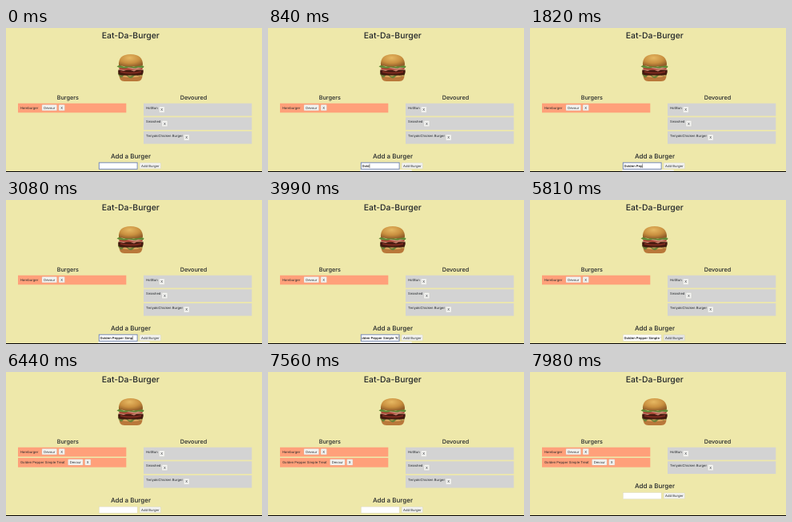
Animation of 320 by 181 pixels, one loop 8 s. Source, as an HTML page:

```html
<!DOCTYPE html>
<html lang="en">
<head>
<meta charset="utf-8">
<title>Eat-Da-Burger</title>
<style>
  html, body { margin: 0; width: 100%; height: 100%; overflow: hidden; background: #eee8aa; }
  svg { display: block; }
  text { font: 4.2px Inter, sans-serif; fill: #212529; white-space: pre; text-rendering: geometricPrecision; }
  .title { font-size: 10.4px; font-weight: 500; text-anchor: middle; }
  .form-title { font-size: 8px; font-weight: 500; text-anchor: middle; }
  .column { font-size: 7.25px; font-weight: 500; text-anchor: middle; }
  .label { text-anchor: middle; }
  .typed { fill: #000; font-weight: 500; }
  .button { fill: #f3f3f1; stroke: #c9c7bd; stroke-width: .3; }
</style>
</head>
<body>
<svg id="stage" width="100%" height="100%" viewBox="0 0 320 181"></svg>
<script>
const LOOP = 8000;
const BLUR_AT = 5670, ADD_AT = 5880, DELETE_AT = 7840;
const POPUP_FROM = 280, POPUP_TO = 4270;
const ROW_STEP = 17.55;
const NAME = "Golden Pepper Simple Treat";
const KEY_TIMES = [280, 420, 700, 840, 980, 1120, 1260, 1470, 1610, 1820, 1960, 2100, 2240,
  2380, 2590, 2730, 2870, 3080, 3220, 3360, 3430, 3710, 3920, 4130, 4270, 4550];

const text = (x, y, label, style = "") => `<text x="${x}" y="${y}" class="${style}">${label}</text>`;
const rect = (x, y, w, h, attrs) => `<rect x="${x}" y="${y}" width="${w}" height="${h}" ${attrs}/>`;
const path = (d, fill) => `<path d="${d}" fill="${fill}"/>`;
const button = (x, y, w, label, id = "") =>
  rect(x, y, w, 7.3, `rx=".6" class="button" id="${id}"`) + text(x + w / 2, y + 5.15, label, "label");

const burgerRow = (id, y, name, buttonX) => `<g id="${id}">
  ${rect(15, y, 135.3, 11.7, 'fill="#ffa07a"')}
  ${text(18, y + 7.2, name)}
  ${button(buttonX, y + 1.8, 18.5, "Devour")}
  ${button(buttonX + 21.1, y + 1.8, 7.2, "X")}</g>`;

const devouredRow = (id, index, name, buttonX) => {
  const y = 94.7 + index * ROW_STEP;
  return `<g id="${id}">
    ${rect(172, y, 135.3, 15.8, 'fill="#d3d3d3"')}
    ${text(175, y + 7.1, name)}
    ${button(buttonX, y + 4.2, 6.8, "X")}</g>`;
};

// Layers from the bottom bun up.
const burger = `<radialGradient id="crust" cx=".45" cy=".3" r=".7">
    <stop stop-color="#e6b862"/><stop offset=".6" stop-color="#c98f3f"/><stop offset="1" stop-color="#93602a"/>
  </radialGradient>` +
  path("M141.500 58H170.500Q171 67 164 67H148Q141 67 141.500 58Z", "#b9783a") +
  path("M142 60.500Q156 64 170 60.500V59H142Z", "#d9a860") +
  path("M140 56q3 3 6 1t6 2t7-1t6 1t6-3v3q-3 3-6 1t-6 1.500t-7-.5t-6 0t-6-3Z", "#6d8238") +
  path("M140.500 52.500H171.500Q173 59 167 59.500H145Q138.500 59 140.500 52.500Z", "#43190f") +
  path("M143 54Q156 57 169 54V56Q156 59 143 56Z", "#7d2c20") +
  path("M141 49H171V53L165 52L160 54.500L153 52L147 54L141 52.500Z", "#c98873") +
  path("M142 50.500Q149 49.500 156 51.500T170 50.500V52Q156 53.500 142 52Z", "#a83a2c") +
  path("M138.500 48.500q3-3 6-1t6 0t6 0t6 0t10 .5q0 3-4 2t-5 0t-6 0t-6 0t-6 .5t-7-2Z", "#5f8a35") +
  path("M141 47Q140 33 155.700 33T171 47Q156 50 141 47Z", "url(#crust)");

const form = `<g id="form">
  ${text(156, 163.7, "Add a Burger", "form-title")}
  ${rect(116.3, 169.2, 47.8, 8.1, 'id="input" fill="#fff"')}
  <svg x="117" y="169.6" width="46.500" height="7.400" overflow="hidden">
    ${text(.4, 5.2, "", "typed")}
    ${rect(0, 1, .4, 5.4, 'id="caret" fill="#111"')}
  </svg>
  ${button(167.2, 169.5, 26.2, "Add Burger", "submit")}</g>`;

const stage = document.getElementById("stage");
stage.innerHTML = rect(0, 0, 320, 181, 'fill="#eee8aa"') +
  text(155.8, 12.8, "Eat-Da-Burger", "title") + burger +
  text(77.3, 90.3, "Burgers", "column") + text(234.5, 90.3, "Devoured", "column") +
  burgerRow("first", 94.7, "Hamburger", 45) + burgerRow("added", 108, NAME, 77.6) +
  devouredRow("top", 0, "HotBun", 191.4) + devouredRow("deleted", 1, "Smashed", 195) +
  devouredRow("last", 2, "TeriyakiChicken Burger", 222.3) + form +
  rect(115.500, 178, 64, 2, 'id="popup" fill="#fff"') +
  rect(0, 180, 320, 1, 'fill="#000"');

const find = selector => stage.querySelector(selector);
const [added, deleted, last, formGroup, input, typed, caret, submit, popup] =
  ["#added", "#deleted", "#last", "#form", "#input", ".typed", "#caret", "#submit", "#popup"].map(find);
const show = (node, visible) => node.setAttribute("visibility", visible ? "visible" : "hidden");

function draw(t) {
  const focused = t < BLUR_AT;
  const count = KEY_TIMES.filter(time => time <= t).length;
  typed.textContent = t < ADD_AT ? NAME.slice(0, count) : "";

  // A focused field scrolls to keep the caret in view.
  const width = count && typed.getComputedTextLength();
  const x = focused ? Math.min(.4, 45.8 - width) : .4;
  typed.setAttribute("x", x);
  caret.setAttribute("x", x + width + .1);
  const lastKey = count ? KEY_TIMES[count - 1] : -500;
  show(caret, focused && (t - lastKey) % 1000 < 500);

  input.setAttribute("stroke", focused ? "#6b80b8" : "#d6d3bd");
  input.setAttribute("stroke-width", focused ? .9 : .4);
  submit.style.fill = !focused && t < ADD_AT ? "#e6e6e6" : "";
  show(popup, t >= POPUP_FROM && t < POPUP_TO);

  const removed = t >= DELETE_AT;
  show(added, t >= ADD_AT);
  show(deleted, !removed);
  for (const node of [last, formGroup])
    node.setAttribute("transform", `translate(0 ${removed ? -ROW_STEP : 0})`);
}

function tick() {
  draw(performance.now() % LOOP);
  requestAnimationFrame(tick);
}
tick();
</script>
</body>
</html>
```
